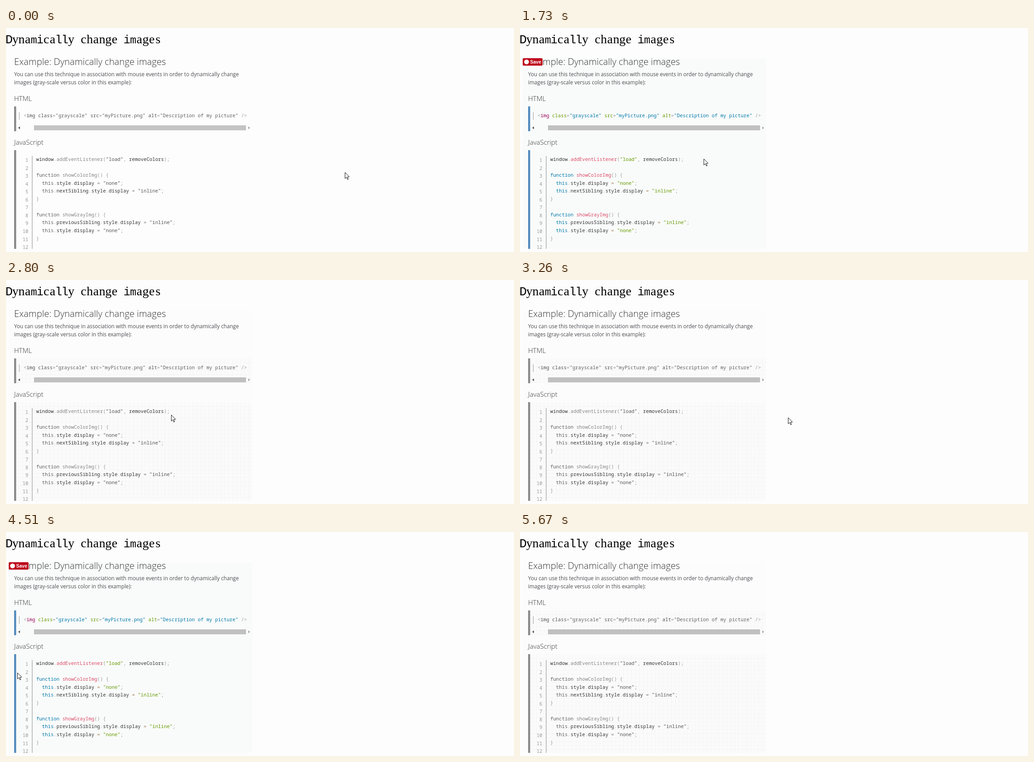
These frames come from a looping animation (1126x497 px, 5970 ms). An HTML page with a canvas:

```html
<!DOCTYPE html>
<html lang="en">
<head>
<meta charset="utf-8">
<title>Dynamically change images</title>
<style>
  html, body { margin: 0; width: 100%; height: 100%; overflow: hidden; background: #fdfdfd; }
  canvas { display: block; }
</style>
</head>
<body>
<canvas id="stage" width="1126" height="497"></canvas>
<script>
const ctx = document.getElementById('stage').getContext('2d');
const LOOP = 5970;
const SANS = '"Open Sans", sans-serif';
const CODE = '10.72px "Noto Sans Mono", "DejaVu Sans Mono", monospace';

// Pointer trips: start, end, then points evenly spaced in time
const HOME = [751, 320];
const TRIPS = [
  [470, 820, 715, 318, 538, 307, 413, 299],
  [1050, 1520, 683, 306, 762, 291, 559, 290, 454, 290],
  [1700, 1730, 405, 290],
  [1730, 2210, 640, 300, 756, 304, 530, 301, 400, 300],
  [2410, 2590, 635, 296],
  [2710, 2800, 366, 299],
  [2800, 2880, 330, 301],
  [3090, 3270, 608, 305],
  [3270, 3530, 318, 311],
  [3530, 3650, -9, 291],
  [3650, 3680, -40, 288],
  [3700, 4000, 523, 302],
  [4000, 4300, 60, 268],
  [4300, 4510, 38, 270, 25, 312],
  [4510, 4920, 60, 320, 480, 336, 858, 350],
  [4920, 5060, 450, 360],
  [5190, 5550, 530, 390],
  [5550, 5670, 867, 430, 1020, 460, 1109, 487, 1180, 515]
];

// Each moment toggles between gray and colour
const SWAPS = [730, 1140, 1420, 1810, 2100, 2530, 2830, 3240, 3350, 3680, 3770, 4830, 5030, 5580];

const INK = {
  plain: '#333333', punct: '#999999', tag: '#990055', attr: '#669900',
  value: '#0077aa', keyword: '#0077aa', func: '#dd4a68',
  string: '#669900', op: '#a67f59', bar: '#528abe'
};

const MARKUP = [
  ['<', 'punct'], ['img', 'tag'],
  [' class', 'attr'], ['=', 'punct'], ['"grayscale"', 'value'],
  [' src', 'attr'], ['=', 'punct'], ['"myPicture.png"', 'value'],
  [' alt', 'attr'], ['=', 'punct'], ['"Description of my picture"', 'value'], [' />', 'punct']
];

const SCRIPT = `window.addEventListener("load", removeColors);

function showColorImg() {
  this.style.display = "none";
  this.nextSibling.style.display = "inline";
}

function showGrayImg() {
  this.previousSibling.style.display = "inline";
  this.style.display = "none";
}
`.split('\n').map(tokenize);

function tokenize(line) {
  const parts = line.match(/"[^"]*"|\w+(?=\()|\w+|\s+|[^\w\s"]/g) || [];
  return parts.map((s, i) => {
    let kind = 'plain';
    if (s[0] === '"') kind = 'string';
    else if (/^(function|this)$/.test(s)) kind = 'keyword';
    else if (parts[i + 1] === '(') kind = 'func';
    else if (s === '=') kind = 'op';
    else if (/^[^\w\s]/.test(s)) kind = 'punct';
    return [s, kind];
  });
}

// Gray is the plain mean of the three channels
function ink(kind, color) {
  const hex = INK[kind];
  if (color) return hex;
  const [r, g, b] = hex.match(/\w\w/g).map(c => parseInt(c, 16));
  const v = Math.round((r + g + b) / 3);
  return `rgb(${v},${v},${v})`;
}

function rect(x, y, w, h, fill) {
  ctx.fillStyle = fill;
  ctx.fillRect(x, y, w, h);
}

function text(s, x, y, font, fill) {
  ctx.font = font;
  ctx.fillStyle = fill;
  ctx.fillText(s, x, y);
}

function shape(points, fill) {
  ctx.beginPath();
  points.forEach(([x, y]) => ctx.lineTo(x, y));
  ctx.closePath();
  ctx.fillStyle = fill;
  ctx.fill();
}

function code(tokens, x, y, color) {
  for (const [s, kind] of tokens) {
    text(s, x, y, CODE, ink(kind, color));
    x += ctx.measureText(s).width;
  }
}

// Title in half-width cells: serif where the letter fits, slab mono otherwise
function title() {
  const slab = { D: 27, m: 23, i: 25, l: 26 };
  ctx.textAlign = 'center';
  [...'Dynamically change images'].forEach((ch, i) => {
    const font = slab[ch]
      ? slab[ch] + 'px "Liberation Mono", monospace'
      : '28px "Liberation Serif", serif';
    text(ch, (i + 0.5) * 13.75, 34, font, '#000');
  });
  ctx.textAlign = 'left';
}

function grid(x, y, w, h) {
  const step = 8.8;
  rect(x, y, w, h, '#fbfbfb');
  for (let gx = x + step; gx < x + w; gx += step) rect(Math.round(gx), y, 1, h, '#f5f5f5');
  for (let gy = y + step; gy < y + h; gy += step) rect(x, Math.round(gy), w, 1, '#f5f5f5');
}

function saveButton() {
  ctx.beginPath();
  ctx.roundRect(6, 67, 44, 16.5, 2);
  ctx.fillStyle = '#bd081c';
  ctx.fill();
  ctx.beginPath();
  ctx.arc(14.5, 75.2, 5.3, 0, Math.PI * 2);
  ctx.fillStyle = '#fff';
  ctx.fill();
  text('Save', 22.5, 79, 'bold 10.5px "Liberation Sans", sans-serif', '#fff');
}

function page(color, started) {
  rect(0, 0, 1126, 497, '#fdfdfd');
  title();

  if (color) rect(6, 67, 540, 423, '#f9fbfa');
  else if (started) {
    rect(6, 67, 540, 423, '#fcfcfc');
    grid(18, 174, 527, 54);
    grid(18, 271, 527, 219);
  }

  text('Example: Dynamically change images', 18, 82, '300 20.3px ' + SANS, '#333');
  text('You can use this technique in association with mouse events in order to dynamically change',
    18, 107, '11.7px ' + SANS, '#4d4e53');
  text('images (gray-scale versus color in this example):', 18, 124.5, '11.7px ' + SANS, '#4d4e53');
  text('HTML', 18, 162, '300 15px ' + SANS, '#333');
  text('JavaScript', 18, 259, '300 15px ' + SANS, '#333');

  const bar = ink('bar', color);
  rect(18, 174, 4.5, 55, bar);
  rect(18, 271, 4.5, 219, bar);

  rect(29, 187, 1, 17, '#999');
  code(MARKUP, 39, 198, color);
  rect(62, 216, 470, 11, started ? '#c0c0c0' : '#c3c3c3');
  shape([[27, 221.5], [31, 218.5], [31, 224.5]], '#505050');
  shape([[541, 221.5], [537, 218.5], [537, 224.5]], '#a3a3a3');

  rect(57.5, 284, 1.2, 206, '#999');
  ctx.save();
  ctx.beginPath();
  ctx.rect(0, 0, 1126, 490);
  ctx.clip();
  SCRIPT.forEach((line, i) => {
    const y = 295 + i * 17.55;
    ctx.textAlign = 'right';
    text(i + 1, 49.5, y + 2, CODE, '#999');
    ctx.textAlign = 'left';
    code(line, 67, y, color);
  });
  ctx.restore();

  if (color) saveButton();
}

function pointerAt(t) {
  let at = HOME;
  for (const [start, end, ...xy] of TRIPS) {
    if (t < start) break;
    const legs = xy.length / 2;
    const pos = Math.min((t - start) / (end - start), 1) * legs;
    const leg = Math.min(Math.floor(pos), legs - 1);
    const from = leg ? xy.slice(leg * 2 - 2, leg * 2) : at;
    at = from.map((v, i) => v + (xy[leg * 2 + i] - v) * (pos - leg));
  }
  return at;
}

function pointer([x, y]) {
  ctx.save();
  ctx.translate(Math.round(x) + 0.5, Math.round(y) + 0.5);
  shape([[0, 0], [0, 13.5], [3.1, 10.6], [5.4, 15.6], [7.4, 14.8], [5.2, 10], [9.4, 9.6]], '#fff');
  ctx.strokeStyle = '#111';
  ctx.lineWidth = 1;
  ctx.stroke();
  ctx.restore();
}

function draw() {
  const t = performance.now() % LOOP;
  const color = SWAPS.filter(s => s <= t).length % 2 === 1;
  page(color, t >= 500);
  pointer(pointerAt(t));
  requestAnimationFrame(draw);
}
draw();
</script>
</body>
</html>
```
